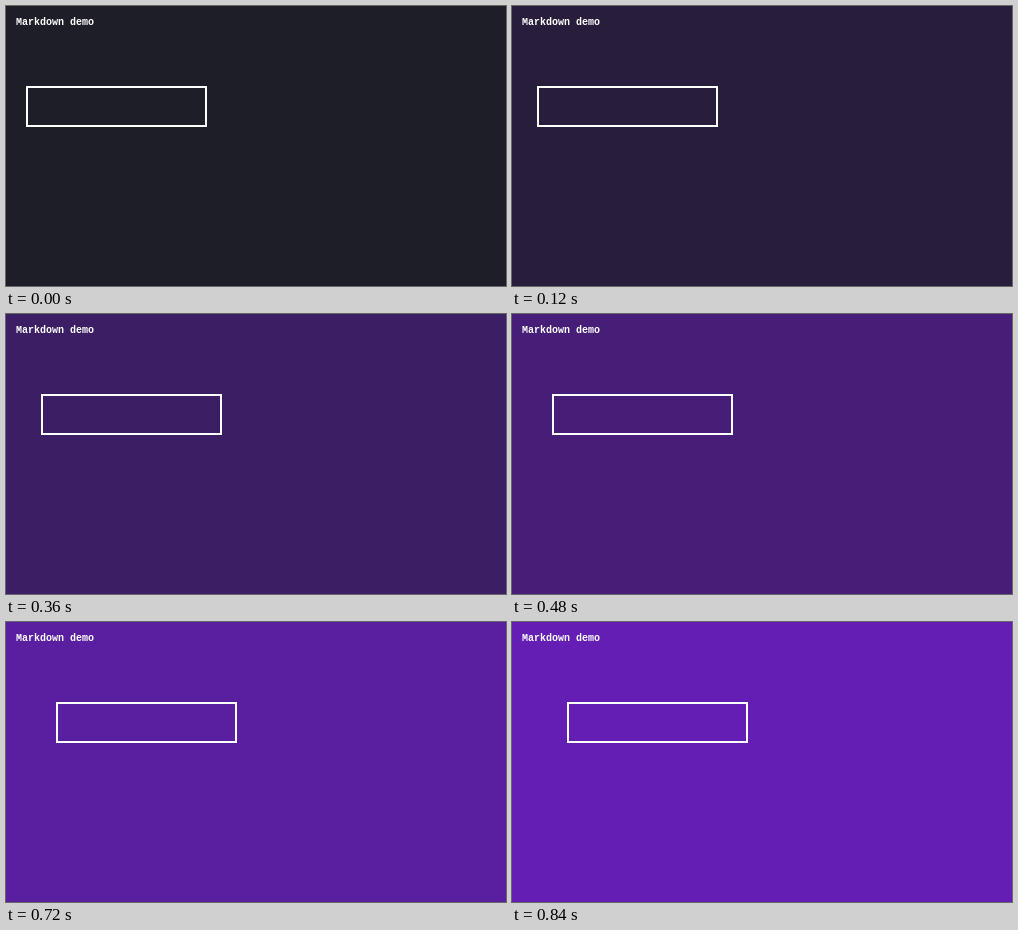
An HTML page with a canvas that plays this animation: 500x280 px, repeating every 960 ms.

```html
<!DOCTYPE html>
<html lang="en">
<head>
<meta charset="utf-8">
<title>Markdown demo</title>
<style>
  html, body { margin: 0; width: 100%; height: 100%; overflow: hidden; background: #1e1e28; }
  canvas { display: block; }
</style>
</head>
<body>
<canvas id="stage" width="500" height="280"></canvas>
<script>
const STEP_MS = 120;
const STEPS = 8;
const ctx = document.getElementById('stage').getContext('2d', { alpha: false });

function draw(step) {
  ctx.fillStyle = `rgb(${30 + 10 * step}, 30, ${40 + 20 * step})`;
  ctx.fillRect(0, 0, 500, 280);

  // 181 x 41 box with a 2px inner outline
  ctx.strokeStyle = '#fff';
  ctx.lineWidth = 2;
  ctx.strokeRect(21 + 5 * step, 81, 179, 39);

  ctx.fillStyle = '#fff';
  ctx.font = 'bold 10px "Liberation Mono", monospace';
  ctx.textBaseline = 'alphabetic';
  ctx.fillText('Markdown demo', 10, 19);
}

const start = performance.now();

function tick() {
  const elapsed = performance.now() - start;
  draw(Math.floor(elapsed / STEP_MS) % STEPS);
  requestAnimationFrame(tick);
}

tick();
</script>
</body>
</html>
```
